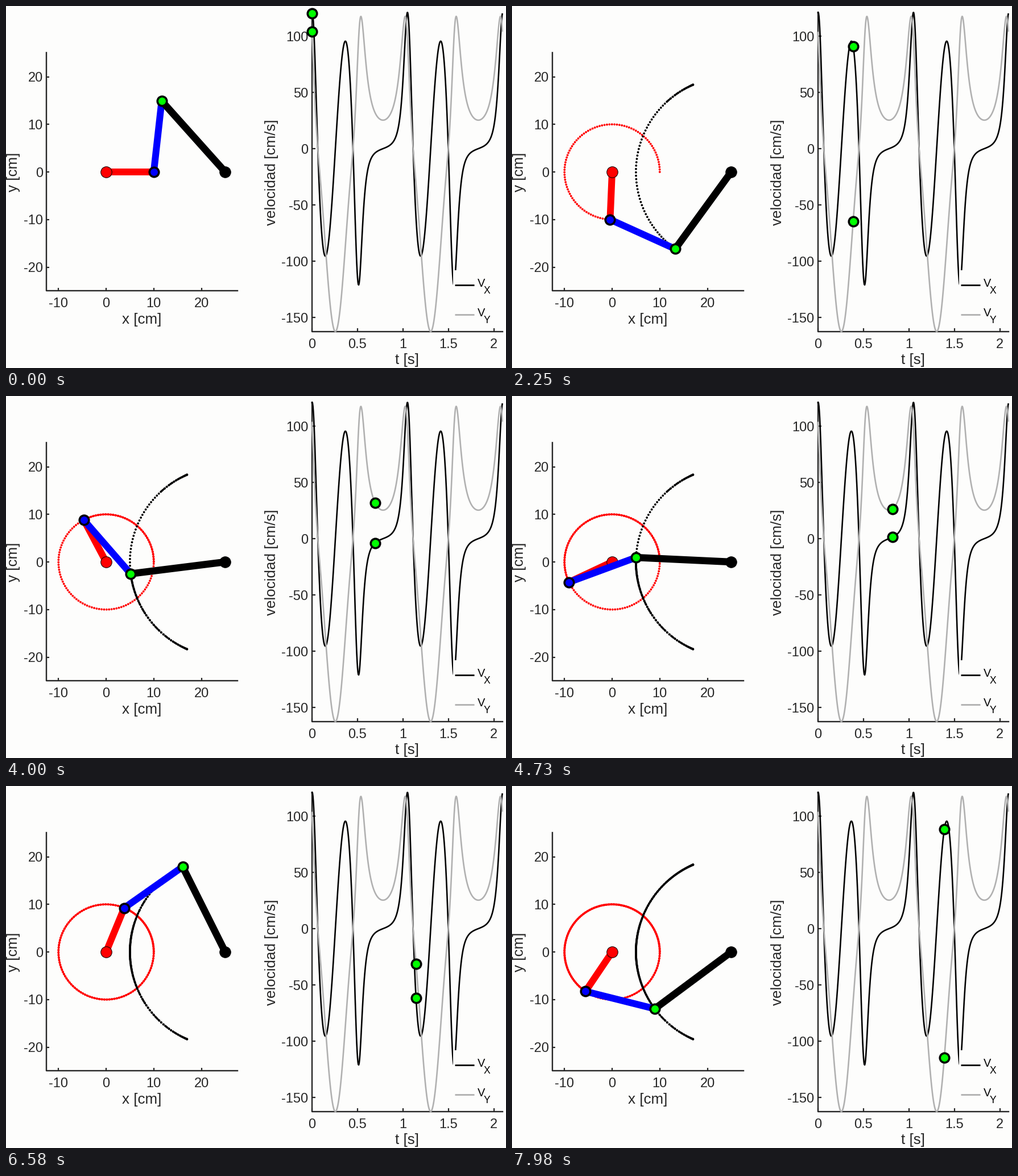
A matplotlib script for the animation above (8000 ms loop, 879x637 px).

```python
import numpy as np
import matplotlib.pyplot as plt
from matplotlib.animation import FuncAnimation
from matplotlib.patches import Rectangle

W, H, DPI = 879, 637, 64
PT = 72 / DPI                      # points per pixel
BG, INK, GRAY, GREEN = "#fdfdfc", "#262626", "#b0b0b0", "#00ff00"

# Four-bar linkage (cm) driven at constant speed
CRANK, COUPLER, ROCKER, BASE = 10, 15, 20, 25
OMEGA, SAMPLES, TURNS = 12, 480, 4

plt.rcParams["font.family"] = "Liberation Sans"
plt.rcParams["path.simplify"] = False


def left_xy(x, y):
    return 176 + 8.375 * np.asarray(x), 292 - 8.375 * np.asarray(y)


def right_xy(t, v):
    return 537.5 + 160 * np.asarray(t), 251 - 1.98 * np.asarray(v)


def linkage(theta):
    """Crank pin and rocker pin; the branch flips at every dead point."""
    bx, by = CRANK * np.cos(theta), CRANK * np.sin(theta)
    d = np.hypot(BASE - bx, by)
    ux, uy = (BASE - bx) / d, -by / d
    a = (COUPLER**2 - ROCKER**2 + d**2) / (2 * d)
    h = np.sqrt(np.clip(COUPLER**2 - a**2, 0, None)) * np.sign(np.cos(theta / 2))
    return bx, by, bx + a * ux - h * uy, by + a * uy + h * ux


step = 2 * np.pi * TURNS / (SAMPLES - 1)
theta = step * np.arange(SAMPLES + 1)
dt = step / OMEGA
t = dt * np.arange(SAMPLES)
bx, by, px, py = linkage(theta)
pins = np.column_stack(left_xy(bx, by))
tips = np.column_stack(left_xy(px, py))
vx = np.column_stack(right_xy(t, np.diff(px) / dt))
vy = np.column_stack(right_xy(t, np.diff(py) / dt))
ground = np.column_stack(left_xy([0, BASE], [0, 0]))

fig = plt.figure(figsize=(W / DPI, H / DPI), dpi=DPI, facecolor=BG)
ax = fig.add_axes([0, 0, 1, 1])
ax.set_xlim(0, W)
ax.set_ylim(H, 0)
ax.axis("off")


def line(x, y, color, width, z, cap="butt"):
    return ax.plot(x, y, color=color, lw=width * PT, zorder=z,
                   solid_capstyle=cap, solid_joinstyle="round")[0]


def dots(points, face, size, edge, z, edge_color="black"):
    # scatter keeps sub-pixel positions, unlike plot markers
    x, y = np.reshape(points, (-1, 2)).T
    return ax.scatter(x, y, s=(size * PT) ** 2, facecolor=face,
                      edgecolor=edge_color, linewidth=edge * PT, zorder=z)


def text(x, y, s, size, ha="center", rot=0, color=INK, z=2):
    ax.text(x, y, s, fontsize=size * PT, ha=ha, va="baseline", rotation=rot,
            rotation_mode="anchor", color=color, zorder=z)


def axes_box(left, right, top, bottom, to_px, xticks, yticks, tick, xbase):
    line([left, left, right], [top, bottom, bottom], INK, 2.4, 1, "projecting")
    for v in xticks:
        x = to_px(v, 0)[0]
        line([x, x], [bottom, bottom - tick], INK, 2.2, 1)
        text(x, xbase, f"{v:g}", 23.6)
    for v in yticks:
        y = to_px(0, v)[1]
        line([left, left + tick], [y, y], INK, 2.2, 1)
        text(left - 6, y + 8.6, f"{v:g}", 23.6, "right")


axes_box(71, 407, 82, 501, left_xy, (-10, 0, 10, 20), range(-20, 21, 10), 5, 530.5)
axes_box(537.5, 873, 11, 572.5, right_xy, (0, 0.5, 1, 1.5, 2),
         range(-150, 101, 50), 6, 601.5)
text(239, 558.5, "x [cm]", 26)
text(20.5, 292.5, "y [cm]", 26, rot=90)
text(705, 630, "t [s]", 26)
text(474, 292.5, "velocidad [cm/s]", 26, rot=90)

# Velocity curves and legend
line(*vx.T, "black", 2.6, 3)
line(*vy.T, GRAY, 2.6, 3.1)
ax.add_patch(Rectangle((785.5, 465), 83, 102, fc=BG, ec="none", zorder=4))
for y, color, sub in ((491, "black", "X"), (542.5, GRAY, "Y")):
    line([789, 823], [y, y], color, 2.8, 5)
    text(828.5, y + 3, "V", 20, "left", color="black", z=5)
    text(839.5, y + 15.5, sub, 17.5, "left", color="black", z=5)

# Mechanism
red_trail = dots([], "red", 3.8, 0, 6, "none")
black_trail = dots([], "black", 3.8, 0, 6.1, "none")
crank = line([], [], "red", 12, 7)
dots(ground[0], "red", 19.5, 1, 7.1)
coupler = line([], [], "blue", 12, 8)
rocker = line([], [], "black", 12.5, 9)
dots(ground[1], "black", 19.5, 1, 9.1)
pin = dots([], "blue", 16.5, 3.6, 10)
tip = dots([], GREEN, 16.5, 3.6, 10.1)
speeds = dots([], GREEN, 16.5, 3.6, 10.2)


def update(i):
    k = max(0, i - 1)              # the first pose is held for two ticks
    joints = [ground[0], pins[k], tips[k], ground[1]]
    for bar, start, end in zip((crank, coupler, rocker), joints, joints[1:]):
        bar.set_data(*zip(start, end))
    pin.set_offsets(pins[k])
    tip.set_offsets(tips[k])
    red_trail.set_offsets(pins[:k + 1])
    black_trail.set_offsets(tips[:k + 1])
    speeds.set_offsets([vx[k], vy[k]])
    return crank, coupler, rocker, pin, tip, red_trail, black_trail, speeds


anim = FuncAnimation(fig, update, frames=320, interval=25, repeat=True,
                     repeat_delay=0, blit=False)
plt.show()
```
